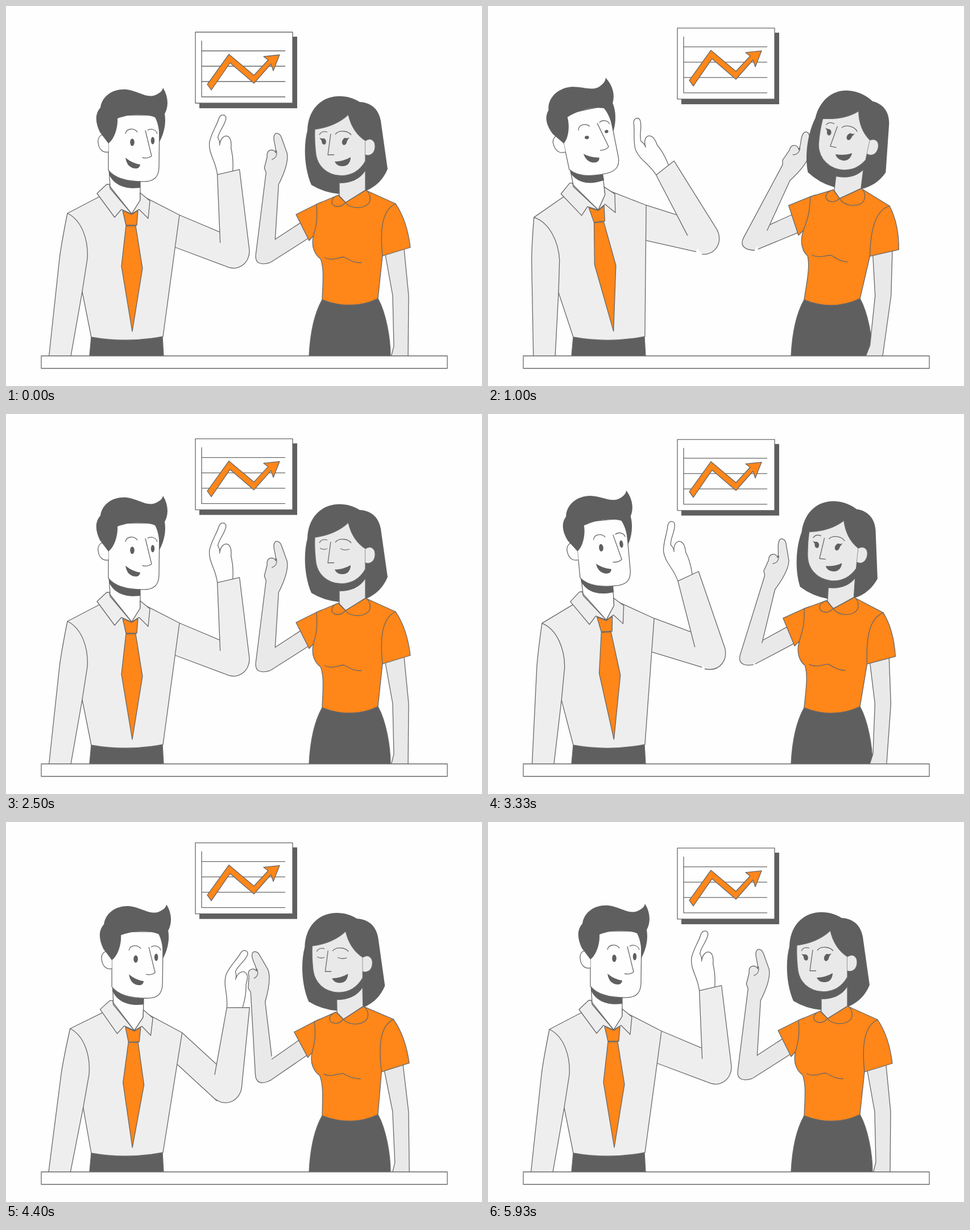
Animation, 837 px wide and 669 px high, one loop 6.01 s. Source, as an HTML page:

```html
<!DOCTYPE html>
<html lang="en">
<head>
<meta charset="utf-8">
<title>High five</title>
<style>
  html, body { margin: 0; width: 100%; height: 100%; overflow: hidden; background: #fefefe; }
  svg { display: block; width: 837px; height: 669px; stroke-linejoin: round; }
</style>
</head>
<body>
<svg id="stage" viewBox="0 0 837 669" stroke="#686868" stroke-width="1.3" fill="none"></svg>
<script>
const NS = 'http://www.w3.org/2000/svg';
const LOOP = 6010, CYCLE = 3000;
const DARK = '#5f5f5f', ORANGE = '#ff8619', SHIRT = '#eeeeee', SKIN = '#e9e9e9', WHITE = '#fefefe';
const stage = document.getElementById('stage');
const movers = [];

function add(tag, attrs, parent = stage) {
  const node = document.createElementNS(NS, tag);
  for (const key in attrs) node.setAttribute(key, attrs[key]);
  return parent.appendChild(node);
}
const path = (parent, d, fill = 'none') => add('path', { d, fill }, parent);
const dark = (parent, d) => add('path', { d, fill: DARK, stroke: 'none' }, parent);

// A person leans about the waist: a point moves in proportion to its height above it.
function person({ side, centre, waist, height, neck, arm }) {
  const bend = ([x, y], { lean }) => {
    const k = lean * (waist - y) / height;
    return [x + side * 0.125 * height * k, y + (side * 0.125 * (x - centre) - 6) * k];
  };
  return {
    body(fill, d) {
      const node = path(stage, d, fill);
      movers.push(pose => node.setAttribute('d',
        d.replace(/([\d.]+) ([\d.]+)/g, (_, x, y) => bend([+x, +y], pose).join(' '))));
    },
    head() {
      const node = add('g', {});
      movers.push(pose => {
        const angle = side * 12 * Math.max(0, pose.lean);
        node.setAttribute('transform',
          `translate(${bend(neck, pose)}) rotate(${angle}) translate(${neck.map(v => -v)})`);
      });
      return node;
    },
    // Two-joint arm; returns the rigid forearm group, drawn in its rest place.
    arm(fill) {
      const sleeve = add('path', { fill, stroke: 'none' });
      const edges = path(stage, '');
      const forearm = add('g', {});
      const { top, bottom, length, shoulder, elbow, rest, crook, heel } = arm;
      const mid = top.map((v, i) => (v + bottom[i]) / 2);
      movers.push(pose => {
        const turn = ([base, back, clap]) => base + back * pose.back + clap * pose.clap;
        const angle = turn(shoulder) * Math.PI / 180;
        const [x, y] = bend(mid, pose);
        const joint = [x + length * Math.cos(angle), y + length * Math.sin(angle)];
        const near = offset => joint.map((v, i) => v + offset[i]);
        const upper = `M${bend(top, pose)}L${near(crook)}`, lower = `${near(heel)}L${bend(bottom, pose)}`;
        sleeve.setAttribute('d', `${upper}L${lower}Z`);
        edges.setAttribute('d', `${upper}M${lower}`);
        forearm.setAttribute('transform',
          `translate(${joint}) rotate(${turn(elbow)}) translate(${rest.map(v => -v)})`);
      });
      return forearm;
    }
  };
}

// Angles are [rest, change when drawn back, change when clapping].
const man = person({
  side: -1, centre: 213, waist: 583, height: 218, neck: [208, 300],
  arm: { top: [305, 368], bottom: [298, 425], length: 108, shoulder: [22, -6, 22], elbow: [0, -25, 17],
    rest: [401, 437], crook: [0, -28], heel: [-16, 21] }
});
const woman = person({
  side: 1, centre: 605, waist: 516, height: 168, neck: [609, 300],
  arm: { top: [525, 377], bottom: [533, 408], length: 84, shoulder: [148.6, 9, -3], elbow: [0, 21, -14],
    rest: [457, 436], crook: [0, -15], heel: [8, 15] }
});

// Wall chart
const chart = add('g', {});
add('rect', { x: 340, y: 54, width: 172, height: 126, fill: DARK, stroke: 'none' }, chart);
add('rect', { x: 333, y: 46, width: 171, height: 125, fill: WHITE }, chart);
path(chart, 'M344 61V160H491M344 79H491M344 106H491M344 133H491');
path(chart, 'M354 138L392 85L436 122L461 95L453 89L481 86L470 114L466 102L436 136L394 100L361 148Z', ORANGE);

// Woman
path(woman.arm(SKIN), 'M465 451C448 457 437 453 439 437L457 293L454 285L459 265C457 252 470 250 474 258'
  + 'C475 246 469 238 471 229C473 221 481 223 484 231L494 259C497 275 486 300 479 314L473 411M475 254C477 262 474 268 467 270', SKIN);
dark(woman.head(), 'M582 159C552 161 531 184 530 219C523 245 524 285 537 315Q560 329 587 331L634 325C652 317 664 304 671 287L659 202C656 185 645 170 622 169C611 162 597 158 582 159Z');
woman.body(SKIN, 'M586 290L586 334L597 346L632 324L632 272');
path(stage, 'M556 517Q608 537 654 515C668 540 676 585 676 616H533C535 575 543 540 556 517Z', DARK);
woman.body(SKIN, 'M667 438L680 510L682 599L676 622L707 622L708 510L700 428');
woman.body(ORANGE, 'M555 345L546 349L510 367L533 413L541 404L556 400Z');
woman.body(ORANGE, 'M584 333L546 349C548 375 546 385 541 403C535 425 545 440 553 445C560 462 557 490 556 517Q608 537 654 515L662 440L700 390L685 348L634 325L597 346Z');
woman.body(ORANGE, 'M685 348C700 370 708 400 711 425L662 440C658 400 659 360 685 348');
woman.body(ORANGE, 'M584 333C569 338 569 353 584 353C591 353 594 349 597 346C604 356 622 357 632 352C644 346 642 331 633 324L597 346Z');
woman.body('none', 'M560 443C574 449 582 443 594 442C603 446 610 452 625 452');

const wFace = woman.head();
dark(wFace, 'M586 296Q619 299 632 272V290Q618 312 586 312Z');
path(wFace, 'M543 217Q580 212 602 191Q609 222 632 237V273Q618 298 590 299C562 298 548 280 545 262Q542 240 543 217Z', SKIN);
path(wFace, 'M632 237C641 231 650 236 649 249C648 261 639 265 632 262', SKIN);
path(wFace, 'M551 227Q555 219 565 222M571 225L566 262H577M579 226C585 218 601 219 607 227');
dark(wFace, 'M578 274Q595 273 606 266C606 277 599 283 590 282Q581 281 578 274Z');
const openEyes = add('g', {}, wFace);
dark(openEyes, 'M551 232Q555 234 559 233C564 235 564 243 560 244C556 244 555 240 555 237Z');
dark(openEyes, 'M604 231Q600 234 596 232C590 235 589 243 594 245C599 244 599 240 600 237Z');
const closedEyes = path(wFace, 'M552 236Q558 240 565 237M588 237Q595 241 604 238');

// Man
const mArm = man.arm(SHIRT);
path(mArm, 'M371 297C368 272 356 262 357 241C359 226 370 211 374 197C378 189 387 191 386 199C384 211 373 221 372 232'
  + 'C374 236 376 238 375 245C376 234 382 228 388 229C395 231 396 240 395 250C399 265 399 278 398 291', WHITE);
path(mArm, 'M376 417L371 297L410 288L427 427C430 448 412 470 385 458', SHIRT);
path(stage, 'M150 582Q212 590 275 581L277 616H147Z', DARK);
man.body(SHIRT, 'M177 329L108 365L134 503L150 583Q212 594 276 582L305 368L243 336L220 368Z');
man.body(SHIRT, 'M108 365C103 390 97 420 94 445L75 622L113 622L134 503L143 445C145 415 135 378 108 365');
man.body(WHITE, 'M181 285L183 318L221 366L236 342L236 305');
man.body(SHIRT, 'M182 314L177 314L160 330L191 372L203 358L221 366L183 321Z');
man.body(SHIRT, 'M236 329L253 343L250 374L234 358L221 366L236 342Z');
man.body(ORANGE, 'M205 360L221 367L232 360L230 386L211 386Z');
man.body(ORANGE, 'M211 387L228 387L240 462L222 573L203 458Z');

const mFace = man.head();
dark(mFace, 'M181 288Q195 309 236 309V320C205 324 188 312 181 296Z');
path(mFace, 'M180 230V289Q196 310 245 309C262 308 268 300 269 285L270 205L262 192H194Z', WHITE);
path(mFace, 'M180 228C168 222 161 231 162 240C163 252 170 259 180 257', WHITE);
dark(mFace, 'M180 242L165 222C157 205 156 190 166 179C169 157 190 145 212 147C235 150 250 166 268 154Q275 150 276 144C286 160 286 178 279 190C282 206 278 224 270 239Q270 210 262 196C240 188 215 191 196 198C197 215 190 235 180 242Z');
path(mFace, 'M210 225C212 214 226 215 231 222M245 219L256 264Q250 269 240 267M249 219C254 215 264 217 266 225');
dark(mFace, 'M210 267Q222 277 236 279C235 287 228 287 222 285Q212 281 210 267Z');
const manEye = (cx, cy, rx) => add('ellipse', { cx, cy, rx, fill: DARK, stroke: 'none' }, mFace);
const manEyes = [manEye(222, 240, 3.8), manEye(258, 237, 3.2)];

// Table
add('rect', { x: 62, y: 616, width: 714, height: 22, fill: WHITE });

function ease(t, from, to) {
  const k = Math.min(1, Math.max(0, (t - from) / (to - from)));
  return k * k * (3 - 2 * k);
}

function render(time) {
  // The picture advances 20 times a second, on uneven 30/70 ms beats.
  const now = Math.min(time % LOOP, 5999);
  const stepped = Math.floor(now / 100) * 100 + (now % 100 >= 30 ? 50 : 0);
  const t = stepped % CYCLE;

  const swing = ease(t, 1000, 1500);
  const back = ease(t, 0, 720) - swing;
  const clap = swing - ease(t, 1570, 2300);
  const pose = { back, clap, lean: back - 0.31 * clap };
  movers.forEach(move => move(pose));

  const lift = 4.7 * (1 - Math.cos(2 * Math.PI * t / CYCLE));
  chart.setAttribute('transform', `translate(0 ${-lift})`);

  const blinking = [1500, 2500].some(moment => Math.abs(t - moment) <= 100);
  openEyes.setAttribute('visibility', blinking ? 'hidden' : 'visible');
  closedEyes.setAttribute('visibility', blinking ? 'visible' : 'hidden');
  const squint = Math.min(1, 0.45 + Math.abs(t - 1000) / 170);
  manEyes.forEach(eye => eye.setAttribute('ry', 6.5 * squint));
}

const start = performance.now();
function tick() {
  render(performance.now() - start);
  requestAnimationFrame(tick);
}
tick();
</script>
</body>
</html>
```
